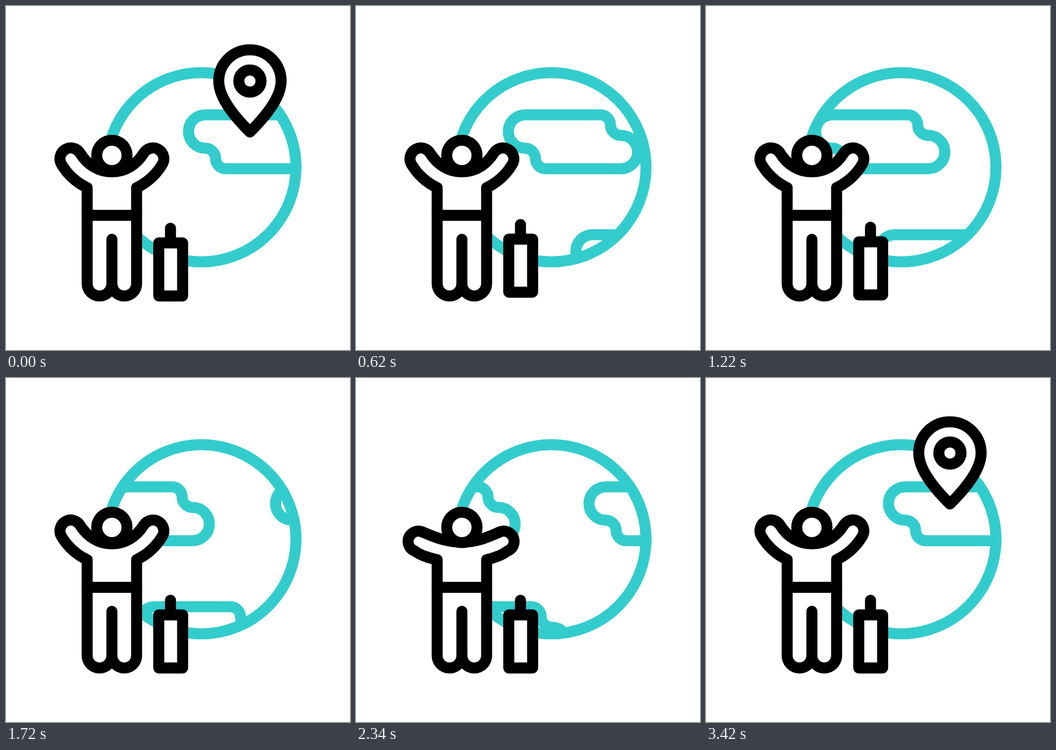
Recreate the animation shown at these times as an HTML page. Size 640 by 640 pixels, loop 3.58 s.

```html
<!DOCTYPE html>
<html lang="en">
<head>
<meta charset="utf-8">
<title>Traveller</title>
<style>
  html, body { margin: 0; width: 100%; height: 100%; overflow: hidden; background: #fff; }
  svg { display: block; width: 100vw; height: 100vh; }
  .line { fill: none; stroke: #000; stroke-width: 20.5; stroke-linecap: round; stroke-linejoin: round; }
  .solid { fill: #fff; }
  .teal { stroke: #33cccd; }
  #pin * { vector-effect: non-scaling-stroke; }
</style>
</head>
<body>
<svg viewBox="0 0 640 640">
  <defs>
    <clipPath id="globe"><circle cx="363.5" cy="300" r="186"/></clipPath>
    <path id="land" class="line teal" d="M370.5 202.5 A31 31 0 0 0 370.5 264.5 A19.5 19.5 0 0 1 390 284
      A18.7 18.7 0 0 0 408.7 302.7 H549 A31 31 0 0 0 549 240.7 A19.5 19.5 0 0 1 529.5 221.2
      A18.7 18.7 0 0 0 510.8 202.5 Z"/>
  </defs>

  <g clip-path="url(#globe)">
    <use id="north" href="#land"/>
    <use id="east" href="#land"/>
    <use id="south" href="#land"/>
  </g>
  <circle class="line teal" cx="363.5" cy="300" r="176"/>

  <g id="bag">
    <path class="line" d="M306 413.5 V436"/>
    <path class="line solid" d="M284.2 440.7 H328.6 V539.4 H284.2 Z"/>
  </g>

  <path id="body" class="line solid"/>
  <path class="line" d="M151 389.5 H243 M197 434 V516.5"/>
  <circle class="line solid" cx="197" cy="278" r="28.2"/>

  <g id="pin">
    <path class="line solid" d="M0 0 C-19.5 -19.5 -58 -59.5 -58 -95 A58 58 0 0 1 58 -95 C58 -59.5 19.5 -19.5 0 0 Z"/>
    <circle class="line" cy="-95" r="20.7"/>
  </g>
</svg>
<script>
const LOOP = 3580, FRAME = 20;
const el = id => document.getElementById(id);
const clamp = (v, lo, hi) => Math.min(hi, Math.max(lo, v));
const ramp = (t, from, to) => clamp((t - from) / (to - from), 0, 1);
const hump = u => Math.sin(Math.PI * u) ** 2;

// Left arm, from neck to shoulder: raised and lowered
const RAISED = [[197, 308.5], [172, 308.5], [151, 295], [138, 274], [103.2, 294.5], [115, 314], [132, 329], [151, 338]];
const LOWERED = [[197, 305.5], [170, 305], [150, 298], [122.5, 286], [109.5, 322], [121, 331], [138, 335], [151, 338]];

function bodyPath(k) {
  const left = RAISED.map(([x, y], i) => [x + (LOWERED[i][0] - x) * k, y + (LOWERED[i][1] - y) * k]);
  const right = left.map(([x, y], i) => [394 - x - (i > 1 && i < 6 ? 3 * k : 0), y]);
  const cap = (a, b) => {
    const r = Math.hypot(a[0] - b[0], a[1] - b[1]) / 2;
    return `A${r} ${r} 0 0 0 ${b}`;
  };
  const [n, a, b, c, d, e, f, g] = left;
  const [, A, B, C, D, E, F, G] = right;
  return `M${n} C${a} ${b} ${c} ${cap(c, d)} C${d} ${e} ${f}`.replace(`C${d} ${e} ${f}`, `C${e} ${f} ${g}`) +
    ` V516.5 A23 23 0 0 0 197 516.5 A23 23 0 0 0 243 516.5 V${G[1]}` +
    ` C${F} ${E} ${D} ${cap(D, C)} C${B} ${A} ${n} Z`;
}

function slide(id, x, y = 0) {
  el(id).setAttribute("transform", `translate(${x} ${y})`);
}

function drawPin(t) {
  const leaving = t < 1500;
  const scale = leaving ? 1 - ramp(t, 320, 590) : ramp(t, 2760, 3025);
  const lift = leaving ? 17 * hump(ramp(t, 190, 510)) : 62 * hump(ramp(t, 2893, 3420));
  const turn = leaving ? 8 * hump(ramp(t, 190, 510)) : 8.2 * hump(ramp(t, 2790, 3420));
  const pin = el("pin");
  pin.setAttribute("visibility", scale > 0.01 ? "visible" : "hidden");
  pin.setAttribute("transform", `translate(453.8 ${234.6 - lift}) rotate(${turn}) scale(${Math.max(scale, 0.01)})`);
}

function draw(t) {
  slide("north", -0.1325 * clamp(t - 197, 0, 3223));
  slide("east", 0.1097 * Math.max(0, 3197 - t));
  slide("south", 131.7 - 0.148 * clamp(t - 200, 0, 3220), 223);
  slide("bag", 0, -17 * hump(3 * ramp(t, 180, 1260)));
  el("body").setAttribute("d", bodyPath(hump(3 * ramp(t, 1290, 2550))));
  drawPin(t);
}

const start = performance.now();
function tick() {
  const t = (performance.now() - start) % LOOP;
  draw(Math.floor(t / FRAME) * FRAME);
  requestAnimationFrame(tick);
}
tick();
</script>
</body>
</html>
```
